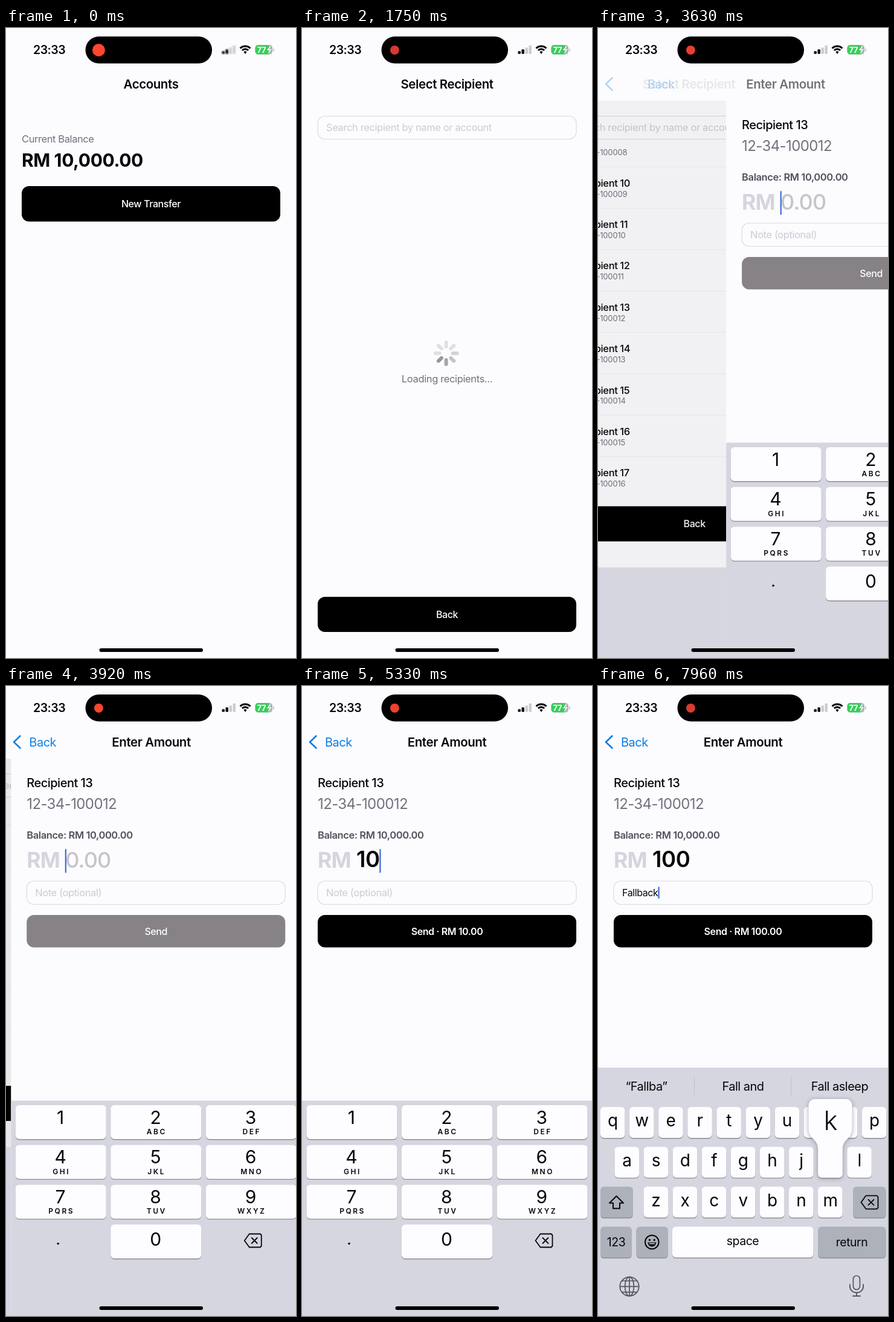
Recreate the animation shown at these times as an HTML page with a canvas. Size 480 px wide and 1040 px high, loop 8000 ms.

```html
<!DOCTYPE html>
<html lang="en">
<head>
<meta charset="utf-8">
<title>Transfer flow</title>
<style>
html, body { margin: 0; width: 100%; height: 100%; overflow: hidden; background: #fcfcff; }
canvas { display: block; width: 480px; height: 1040px; }
</style>
</head>
<body>
<canvas id="stage"></canvas>
<script>
const W = 480, H = 1040, LOOP = 8000;
const PAGE = '#fcfcff', INK = '#060608', MUTED = '#70727e', PALE = '#cbccd4', EDGE = '#d9dae2',
      BLUE = '#0a7ee4', BOARD = '#d5d6df', GREY = '#adb1ba', KEY = '#fdfdff';
const canvas = document.getElementById('stage'), c = canvas.getContext('2d');
const dpr = window.devicePixelRatio || 1;
canvas.width = W * dpr;
canvas.height = H * dpr;

const clamp = v => Math.max(0, Math.min(1, v));
const lerp = (a, b, p) => a + (b - a) * p;
const ease = p => { p = clamp(p); return p * p * (3 - 2 * p); };
// Share of the way still to go in a critically damped spring
const rest = (t, tau) => t <= 0 ? 1 : (1 + t / tau) * Math.exp(-t / tau);

// ---- Drawing helpers ----
function text(s, x, y, size, weight = 400, color = INK, align = 'left', spacing = -.025) {
  c.font = `${weight} ${size}px Inter, sans-serif`;
  c.letterSpacing = size * spacing + 'px';
  c.textAlign = align;
  c.fillStyle = color;
  c.fillText(s, x, y);
  return c.measureText(s).width;
}
const label = (s, x, y, size, weight, color, spacing) =>
  text(s, x, y, size, weight, color, 'center', spacing);

function box(x, y, w, h, r, fill, stroke) {
  c.beginPath();
  c.roundRect(x, y, w, h, r);
  if (fill) { c.fillStyle = fill; c.fill(); }
  if (stroke) { c.strokeStyle = stroke; c.lineWidth = 1.2; c.stroke(); }
}
function line(points, width, color, closed, fill) {
  c.beginPath();
  points.forEach(([x, y]) => c.lineTo(x, y));
  if (closed) c.closePath();
  c.lineCap = c.lineJoin = 'round';
  c.lineWidth = width;
  c.strokeStyle = color;
  c.stroke();
  if (fill) { c.fillStyle = fill; c.fill(); }
}
function ring(x, y, rx, ry, width, color, from = 0, to = 7) {
  c.beginPath();
  c.ellipse(x, y, rx, ry, 0, from, Math.min(to, from + Math.PI * 2));
  c.lineWidth = width;
  c.strokeStyle = color;
  c.stroke();
}
function disc(x, y, r, color) {
  c.beginPath();
  c.arc(x, y, r, 0, Math.PI * 2);
  c.fillStyle = color;
  c.fill();
}
function layer(draw, x = 0, y = 0, alpha = 1) {
  c.save();
  c.translate(x, y);
  c.globalAlpha *= alpha;
  draw();
  c.restore();
}
function clipped(x, y, w, h, draw) {
  c.save();
  c.beginPath();
  c.rect(x, y, w, h);
  c.clip();
  draw();
  c.restore();
}
const fillPage = () => box(0, 0, W, H, 0, PAGE);
const title = s => label(s, 240, 100, 20.4, 600, INK, -.018);
function button(s, y, h, weight = 500, fill = '#000') {
  box(26, y, 428, h, 12, fill);
  label(s, 240, y + h / 2 + 5.8, 16, weight, '#fff');
}

// ---- Status bar ----
function statusBar(t) {
  text('23:33', 45, 43, 19.5, 600);
  box(131.5, 14, 209.5, 44.5, 22.2, '#000');
  const glow = t < 80 ? 1 : .5 - .5 * Math.cos((t - 80) / 1600 * Math.PI * 2);
  disc(153.4, 36.4, lerp(10.5, 7.5, ease(t / 260)), `rgb(${lerp(214, 255, glow)},${lerp(58, 70, glow)},48)`);

  c.save();
  if (t < 240) c.filter = `blur(${1.3 * (1 - t / 240)}px)`;
  [4.5, 7.5, 10.5, 14].forEach((h, i) =>
    box(357.5 + i * 6, 42.8 - h, 4.4, h, 1.2, i < 2 ? '#000' : '#cacacf'));
  c.restore();

  const a = Math.PI * 1.25, b = Math.PI * 1.75;
  c.lineCap = 'butt';
  ring(396, 42, 12, 12, 3, '#000', a, b);
  ring(396, 42, 7.2, 7.2, 3, '#000', a, b);
  c.beginPath();
  c.moveTo(396, 43);
  c.arc(396, 42, 3.6, a, b);
  c.fillStyle = '#000';
  c.fill();

  box(412.5, 28, 28.5, 15.6, 5, '#b2b3b8');
  clipped(412, 27, 23, 18, () => box(412.5, 28, 28.5, 15.6, 5, '#38cf5a'));
  box(442, 33.5, 1.8, 5, 1, '#bfc0c5');
  text('77', 415.5, 40.6, 13, 700, '#fff');
  line([[437, 31], [433, 36.4], [438.4, 35.4], [434.6, 41]], 1.3, '#fff');
}

// ---- Screens ----
function accounts(t) {
  fillPage();
  title('Accounts');
  text('Current Balance', 26, 189, 16.5, 400, MUTED);
  text('RM 10,000.00', 26, 228.5, 30, 700, INK, 'left', -.013);
  const press = ease((t - 700) / 80) * (1 - ease((t - 860) / 120));
  layer(() => button('New Transfer', 261, 58.5), 0, 0, 1 - .3 * press);
}

const LOADED = 1960, PITCH = 68.35, LIST_TOP = 196;

function spinner(t) {
  const head = Math.floor(t / 125) + 7;
  const shades = ['#97979c', '#a5a5aa', '#c3c3c8', '#d2d2d7'];
  for (let i = 0; i < 8; i++) {
    const a = i * Math.PI / 4, age = (((head - i) % 8) + 8) % 8;
    const at = r => [238.6 + Math.sin(a) * r, 537 - Math.cos(a) * r];
    line([at(11), at(18)], 6, shades[age] || '#dfdfe4');
  }
  label('Loading recipients...', 240, 585, 16.5, 400, MUTED, -.022);
}

function list(t) {
  const scroll = 582 * (1 - rest(t - 2100, 121));
  clipped(0, LIST_TOP, W, 717, () => {
    const first = Math.floor(scroll / PITCH);
    for (let i = first; i < first + 13; i++) {
      const y = LIST_TOP + i * PITCH - scroll;
      text('Recipient ' + (i + 1), 43, y + 32.6, 16.5, 500);
      text('12-34-' + (100000 + i), 43, y + 49.4, 13, 400, MUTED, 'left', -.012);
      line([[418.6, y + 31.4], [424.8, y + 36.8], [418.6, y + 42.2]], 3.4, '#a0a2aa');
      box(26, y + 67.8, 428, 1, 0, '#efeff3');
    }
  });
  const shown = ease((t - 2080) / 100) * (1 - ease((t - 3100) / 250));
  layer(() => box(447, 196.5 + scroll * .008, 4, 44, 2, '#a4a4a8'), 0, 0, shown);
}

// lift is the space the keyboard takes from the bottom
function recipients(t, lift = 0) {
  fillPage();
  title('Select Recipient');
  box(26, 145.5, 428, 38, 12, null, EDGE);
  text('Search recipient by name or account', 40, 170, 16.5, 400, PALE, 'left', -.023);
  if (t < LOADED) spinner(t); else list(t);
  if (lift > 1) box(0, 913 - lift, W, 200 + lift, 0, PAGE);
  button('Back', 939 - lift, 58);
}

const AMOUNT_FOCUS = 3500, NOTE_FOCUS = 6100;
const DIGITS = [[4800, '1'], [5200, '0'], [5520, '0']];
const LETTERS = [6800, 6970, 7120, 7260, 7430, 7600, 7770, 7930].map((at, i) => [at, 'Fallback'[i]]);
const typed = (keys, t) => keys.filter(([at]) => at <= t).map(k => k[1]).join('');
const held = (keys, t) => (keys.find(([at]) => t >= at - 20 && t < at + 100) || [])[1];

// Blinks, but starts afresh with each key
function caret(t, x, y, h) {
  const events = [AMOUNT_FOCUS, NOTE_FOCUS, ...[...DIGITS, ...LETTERS].map(k => k[0])];
  const last = Math.max(AMOUNT_FOCUS, ...events.filter(at => at <= t));
  if ((t - last) % 1000 < 560) box(x, y, 2.2, h, 1, '#3c68dc');
}

function amount(t) {
  fillPage();
  text('Recipient 13', 26, 166.5, 20, 500);
  text('12-34-100012', 26, 202.5, 24, 400, MUTED);
  text('Balance: RM 10,000.00', 26, 251.5, 16.5, 600, '#4f515c');
  text('RM', 26, 299.5, 35.5, 700, '#d4d5dd');
  const sum = typed(DIGITS, t), note = typed(LETTERS, t);
  const sumWidth = sum ? text(sum, 90, 299, 36.5, 600, INK, 'left', -.01) : 0;
  if (!sum) text('0.00', 90, 300, 36, 500, '#c5c5cb');
  box(26, 322, 428, 38.5, 12, null, EDGE);
  const noteWidth = note ? text(note, 40, 347, 16, 400) : 0;
  if (!note) text('Note (optional)', 40, 347, 16.5, 400, PALE);
  if (t < NOTE_FOCUS) caret(t, 89.5 + sumWidth, 269, 39.5);
  else caret(t, 40 + noteWidth, 331.5, 19.5);
  button(sum ? `Send · RM ${sum}.00` : 'Send', 378, 53.5, sum ? 600 : 500, sum ? '#000' : '#878285');
  keyboard(t);
}

// ---- Keyboards ----
function key(x, y, w, h, fill = KEY) {
  box(x, y + 1.4, w, h, 6, '#8d8f96');
  box(x, y, w, h, 6, fill);
}
function backspace(x, y) {
  line([[x - 14, y], [x - 6, y - 11], [x + 12, y - 11], [x + 14, y - 9], [x + 14, y + 9],
        [x + 12, y + 11], [x - 6, y + 11]], 1.8, INK, true);
  line([[x - 2, y - 4.5], [x + 7, y + 4.5]], 1.8, INK);
  line([[x + 7, y - 4.5], [x - 2, y + 4.5]], 1.8, INK);
}

function numberPad(t) {
  const names = ['', 'ABC', 'DEF', 'GHI', 'JKL', 'MNO', 'PQRS', 'TUV', 'WXYZ'];
  const down = held(DIGITS, t);
  const digit = (n, col, row, name) => {
    const x = 7.5 + col * 157.5, y = 692 + row * 65.7, cx = x + 75;
    key(x, y, 150, 56, down === String(n) ? GREY : KEY);
    label(n, cx - 1, y + (n ? 30.5 : 34.5), 30, 400);
    if (name) label(name, cx + 1, y + 48, 12, 600, INK, .21);
  };
  names.forEach((name, i) => digit(i + 1, i % 3, Math.floor(i / 3), name));
  digit(0, 1, 3);
  disc(78, 920.5, 1.8, INK);
  backspace(400.5, 915.5);
}

const ROWS = [['qwertyuiop', 4, 695], ['asdfghjkl', 27.5, 760.7], ['zxcvbnm', 75.5, 826.5]];

function suggestions(n) {
  if (n < 1) return ['I', 'The', 'I’m'];
  if (n < 4) return ['“F”', 'For', 'First'];
  if (n < 7) return ['“Fall”', 'Falling', 'Falls'];
  return ['“Fallba”', 'Fall and', 'Fall asleep'];
}

function popup(letter) {
  const ch = letter.toLowerCase(), [row, left, top] = ROWS.find(r => r[0].includes(ch));
  c.save();
  c.translate(left + row.indexOf(ch) * 48.1 + 20.3, top - 79);
  c.shadowColor = 'rgba(60,62,75,.45)';
  c.shadowBlur = 7 * dpr;
  c.shadowOffsetY = dpr;
  c.beginPath();
  c.moveTo(0, 0);
  c.arcTo(36, 0, 36, 10, 10);
  c.lineTo(36, 48);
  c.bezierCurveTo(36, 68, 20.3, 64, 20.3, 84);
  c.arcTo(20.3, 130, 15, 130, 6);
  c.arcTo(-20.3, 130, -20.3, 124, 6);
  c.lineTo(-20.3, 84);
  c.bezierCurveTo(-20.3, 64, -36, 68, -36, 48);
  c.arcTo(-36, 0, -26, 0, 10);
  c.closePath();
  c.fillStyle = KEY;
  c.fill();
  c.shadowColor = 'transparent';
  label(letter, 0, 51, 43, 300);
  c.restore();
}

function letterPad(t) {
  const count = typed(LETTERS, t).length, caps = !count, down = held(LETTERS, t);
  suggestions(count).forEach((s, i) => label(s, 80 + i * 160, 668, 20, 400));
  [159, 319].forEach(x => box(x, 645, 1, 31, 0, '#bfc0c8'));

  for (const [row, left, top] of ROWS) [...row].forEach((ch, i) => {
    const x = left + i * 48.1;
    key(x, top, 40.5, 51);
    if (caps) label(ch.toUpperCase(), x + 20.2, top + 36, 26, 400);
    else label(ch, x + 20.2, top + 32, 28, 400);
  });

  key(4, 826.5, 54, 51, caps ? KEY : GREY);
  line([[30.5, 842], [42, 853.5], [36, 853.5], [36, 862.5], [25, 862.5], [25, 853.5], [19, 853.5]],
       2, INK, true, caps && INK);
  key(422, 826.5, 54.5, 51, GREY);
  backspace(449.5, 852.3);

  key(4, 892.5, 52, 51, GREY);
  label('123', 30, 925, 19.5);
  key(63.5, 892.5, 52.5, 51, GREY);
  ring(89.3, 918, 11.3, 11.3, 2, INK);
  disc(85.4, 914.5, 1.7, INK);
  disc(93.2, 914.5, 1.7, INK);
  c.beginPath();
  c.arc(89.3, 918.6, 7, 0, Math.PI);
  c.closePath();
  c.fill();
  box(84.3, 919.6, 10, 1.8, .8, GREY);
  key(123, 892.5, 233.5, 51);
  label('space', 239.5, 923, 19.5);
  key(364, 892.5, 112.5, 51, GREY);
  label('return', 420, 924.5, 19.5);

  const icon = '#54565f';
  ring(52, 991.3, 15.7, 15.7, 1.7, icon);
  ring(52, 991.3, 7.4, 15.7, 1.7, icon);
  line([[52, 976], [52, 1007]], 1.7, icon);
  line([[36.5, 991.3], [67.5, 991.3]], 1.7, icon);
  line([[40, 982], [64, 982]], 1.7, icon);
  line([[40, 1000.6], [64, 1000.6]], 1.7, icon);
  c.beginPath();
  c.roundRect(422.4, 973.5, 11, 23, 5.5);
  c.stroke();
  line([[417, 988], [417, 992]], 1.8, icon);
  line([[439, 988], [439, 992]], 1.8, icon);
  ring(428, 991.5, 11, 10, 1.8, icon, 0, Math.PI);
  line([[428, 1002], [428, 1007]], 1.8, icon);
  line([[422, 1007], [434, 1007]], 1.8, icon);

  if (down) popup(down);
}

function keyboard(t) {
  const p = ease((t - NOTE_FOCUS - 40) / 250), top = lerp(684.5, 630, p);
  box(0, top, W, H - top, 0, BOARD);
  if (p < 1) layer(() => numberPad(t), 0, 0, 1 - p);
  if (p > 0) layer(() => letterPad(t), 0, (1 - p) * 54, p);
}

// ---- Navigation ----
const PUSH_TAU = 70, FIRST_PUSH = 920;

function push(from, to, r, lift = 0) {
  layer(from, -144 * (1 - r));
  box(0, 0, W, H, 0, `rgba(0,0,0,${.08 * (1 - r)})`);
  if (lift) box(0, H - lift, W, lift, 0, BOARD);
  layer(to, W * r);
}

function amountHeader(r) {
  box(0, 0, W, 120, 0, PAGE);
  layer(() => title('Select Recipient'), -160 * (1 - r), 0, r ** 3);
  layer(() => title('Enter Amount'), 240 * r ** 1.5, 0, 1 - r);
  layer(() => {
    line([[23.5, 82.5], [13, 92.5], [23.5, 102.5]], 2.7, BLUE);
    text('Back', 38 + 150 * r ** 1.5, 99.8, 20, 400, BLUE);
  }, 0, 0, (1 - r) ** 2);
}

function draw(t) {
  c.setTransform(dpr, 0, 0, dpr, 0, 0);
  if (t < FIRST_PUSH) accounts(t);
  else if (t < AMOUNT_FOCUS) {
    const r = rest(t - FIRST_PUSH, PUSH_TAU);
    if (r > .001) push(() => accounts(t), () => recipients(t), r);
    else recipients(t);
  } else {
    const r = rest(t - AMOUNT_FOCUS, PUSH_TAU);
    const lift = 279 * ease((t - AMOUNT_FOCUS) / 250);
    if (r > .001) push(() => recipients(t, lift), () => amount(t), r, lift);
    else amount(t);
    amountHeader(r > .001 ? r : 0);
  }
  statusBar(t);
  box(154.5, 1024, 171.5, 6, 3, '#000');
}

function tick() {
  draw(performance.now() % LOOP);
  requestAnimationFrame(tick);
}
tick();
</script>
</body>
</html>
```
